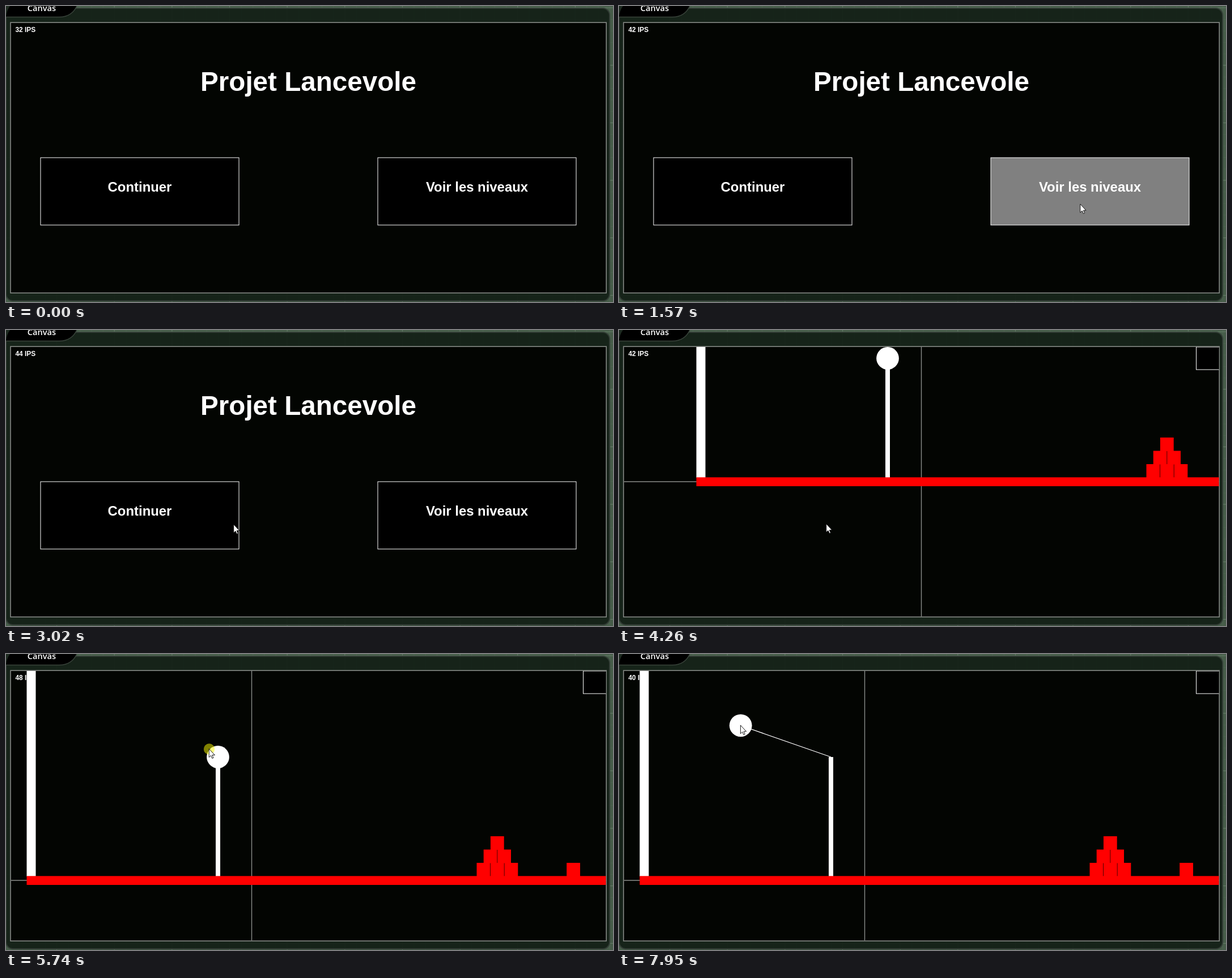
Recreate the animation shown at these times as an HTML page. Size 1071 by 523 pixels, loop 8000 ms.

```html
<!DOCTYPE html>
<html lang="fr">
<head>
<meta charset="utf-8">
<title>Canvas</title>
<style>
  html, body { margin: 0; width: 100%; height: 100%; overflow: hidden; background: #465c49; }
  svg { display: block; width: 1071px; height: 523px; }
  text { fill: #fff; font: bold 23.9px "Liberation Sans", Arial, sans-serif; text-anchor: middle; }
  .title { font-size: 47.6px; }
  .fps { font-size: 11.9px; text-anchor: start; }
  .tab { font: 600 14.6px "Open Sans", sans-serif; }
  .line { fill: none; stroke: #8a8d8a; stroke-width: 1.4; }
  .button { fill: #000; stroke: #fff; }
  .button.hover { fill: #808080; }
  .red { fill: #f00; }
  .white { fill: #fff; }
</style>
</head>
<body>
<svg viewBox="0 0 1071 523">
  <defs>
    <pattern id="minor" width="20.32" height="20.32" x="89.5" y="3" patternUnits="userSpaceOnUse">
      <path d="M.5 0V21M0 .5H21" stroke="#80a286" stroke-opacity=".1" fill="none"/>
    </pattern>
    <pattern id="major" width="101.65" height="101.65" x="89" y="2.5" patternUnits="userSpaceOnUse">
      <path d="M.5 0V102M0 .5H102" stroke="#a5c4aa" stroke-opacity=".3" fill="none"/>
    </pattern>
    <clipPath id="view"><rect x="9" y="30" width="1049.5" height="476"/></clipPath>
  </defs>

  <!-- Page and panel -->
  <rect width="1071" height="523" fill="#465c49"/>
  <rect width="1071" height="523" fill="url(#minor)"/>
  <rect width="1071" height="523" fill="url(#major)"/>
  <rect x="0" y="4" width="1065" height="517" rx="12" fill="#142017" fill-opacity=".94" stroke="#333d36" stroke-width="2"/>
  <path d="M0 19.5H94Q116 19.5 125 0H0Z"/>
  <path d="M0 19.5H94Q116 19.5 125 0" fill="none" stroke="#39433b" stroke-width="1.5"/>
  <path d="M0 0V20Q1 8 7 0Z" fill="#1d2a20"/>
  <text class="tab" x="63" y="9">Canvas</text>
  <rect x="8" y="29.2" width="1051.2" height="477.8" fill="#030502" stroke="#858985" stroke-width="1.6"/>

  <g clip-path="url(#view)">
    <path class="line" id="axes" d="M533.5 -300V900M-300 268H1400"/>
    <text class="fps" id="fps" x="16.5" y="46"></text>

    <g id="menu">
      <text class="title" x="533.5" y="150">Projet Lancevole</text>
      <rect class="button" id="left" x="61" y="268" width="350" height="119"/>
      <text x="236" y="328">Continuer</text>
      <rect class="button" id="right" x="656" y="268" width="350" height="119"/>
      <text x="831" y="328">Voir les niveaux</text>
    </g>

    <g id="level">
      <g id="world">
        <rect class="white" x="136.5" y="-300" width="16" height="561"/>
        <rect class="white" x="470" y="50" width="8" height="211"/>
        <g id="blocks"></g>
        <rect class="red" x="136.5" y="260.3" width="1500" height="15.7"/>
      </g>
      <line id="rope" x1="374" y1="182" stroke="#fff" stroke-width="1.2"/>
      <circle class="white" id="ball" r="19.9"/>
      <rect class="button" x="1018.5" y="30" width="41" height="40"/>
    </g>
  </g>

  <circle id="press" r="9.7" fill="#ff0" fill-opacity=".5"/>
  <path id="cursor" d="M-.3 -.5V14.500l3.300-3.100 2.300 5 2.200-1-2.200-4.800h4.600z" fill="#fff" stroke="#000" stroke-width=".9"/>
</svg>

<script>
  const LOOP = 8000, ENTER = 270, PLAY = 3580, PRESS = 5720, GRAB = 5780, RELEASE = 7950;
  const $ = id => document.getElementById(id);
  const show = (id, on) => $(id).style.display = on ? "" : "none";
  const place = (id, x, y) => $(id).setAttribute("transform", `translate(${x} ${y})`);
  const clamp = v => Math.min(1, Math.max(0, v));
  const ease = u => u * u * (3 - 2 * u);
  const mix = (a, b, u) => a + (b - a) * u;

  // Pointer stops; dx and dy swing out and back on the way to the next stop.
  const stops = [
    { t: ENTER, x: 238, y: 389, dy: -45 },
    { t: 1050, x: 250, y: 377, dx: 560, dy: -20 },
    { t: 2220, x: 299, y: 360, dx: 400 },
    { t: 3020, x: 402, y: 344 },
    { t: 3450, x: 366, y: 343 },
    { t: 4390, x: 366, y: 343 },
    { t: 5200, x: 472, y: 302 },
    { t: 5740, x: 358.5, y: 168 },
    { t: 6000, x: 358.5, y: 168 },
    { t: 6730, x: 226, y: 122 },
    { t: 7750, x: 214.7, y: 126.3 }
  ];

  function pointer(t) {
    const i = Math.max(0, stops.findLastIndex(s => s.t <= t));
    const a = stops[i], b = stops[i + 1] || a;
    const u = clamp((t - a.t) / (b.t - a.t || 1));
    const swing = Math.sin(Math.PI * u) ** 2;
    return [
      mix(a.x, b.x, ease(u)) + (a.dx || 0) * swing,
      mix(a.y, b.y, ease(u)) + (a.dy || 0) * swing
    ];
  }

  // The frame rate is refreshed once a second.
  const rates = [32, 42, 48, 44, 42, 46, 48, 41, 40];
  const rate = t => rates[Math.floor((t + 400) / 1000)];

  function block(x, row) {
    const r = document.createElementNS("http://www.w3.org/2000/svg", "rect");
    const box = { x, y: 237 - row * 23.5, width: 23.8, height: 24, class: "red" };
    for (const k in box) r.setAttribute(k, box[k]);
    $("blocks").append(r);
  }
  for (let row = 0; row < 3; row++)
    for (let i = 0; i < 3 - row; i++) block(930.5 + row * 12.2 + i * 24.5, row);
  block(1089.2, 0);

  function draw(t) {
    const [x, y] = pointer(t);
    const playing = t >= PLAY, shown = t >= ENTER, held = t >= GRAB;
    const over = left => shown && x > left && x < left + 334 && y > 268 && y < 370;

    show("menu", !playing);
    show("level", playing);
    show("axes", playing);
    $("left").classList.toggle("hover", over(61));
    $("right").classList.toggle("hover", over(656));
    $("fps").textContent = rate(t) + " IPS";

    const pan = clamp((t - 4420) / 750);
    const camera = [-100 * pan, 132 * pan];
    place("axes", ...camera);
    place("world", ...camera);

    place("ball", ...(held ? [x, y] : [474 + camera[0], 50 + camera[1]]));
    show("rope", held);
    $("rope").setAttribute("x2", x);
    $("rope").setAttribute("y2", y);

    show("press", (t >= PLAY - 80 && t < PLAY) || (t >= PRESS && t < RELEASE));
    place("press", x, y);
    show("cursor", shown);
    place("cursor", x, y);
  }

  const start = performance.now();
  function tick() {
    draw((performance.now() - start) % LOOP);
    requestAnimationFrame(tick);
  }
  tick();
</script>
</body>
</html>
```
